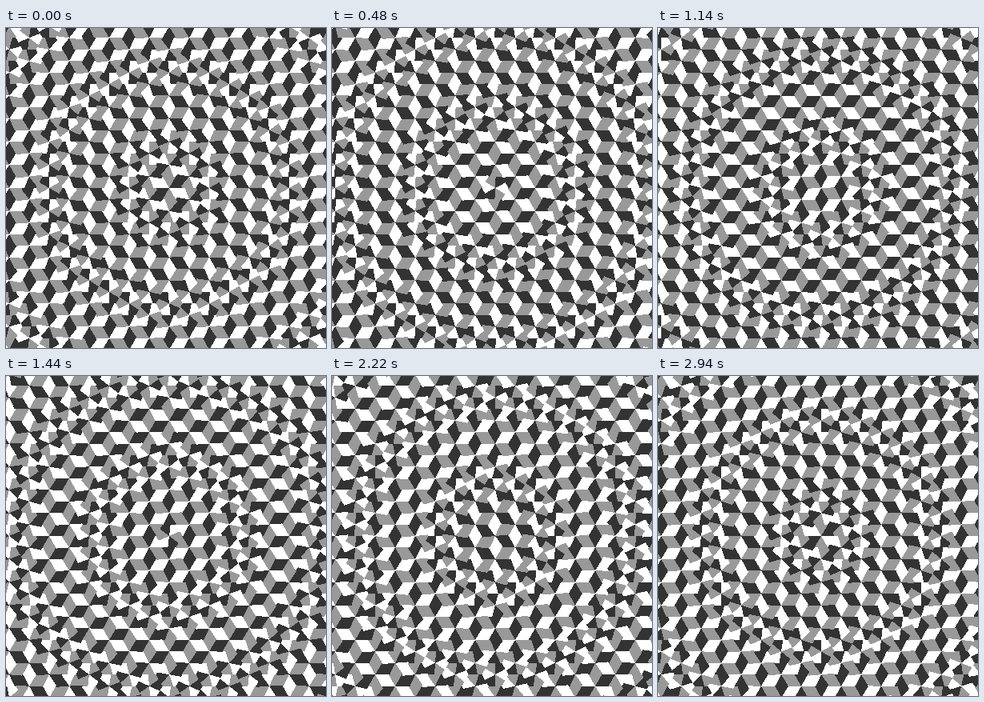
An HTML page with a canvas that plays this animation: 400x400 px, repeating every 3 s.

```html
<!DOCTYPE html>
<html>
<head>
<meta charset="utf-8">
<title>Turning hexagons</title>
<style>
html, body { margin: 0; width: 100%; height: 100%; overflow: hidden; background: #fff; }
canvas { display: block; width: 400px; height: 400px; }
</style>
</head>
<body>
<canvas id="stage" width="400" height="400"></canvas>
<script>
const SIZE = 400, CX = 204, CY = 200;
const COL = 25, ROW = 50 / Math.sqrt(3);   // spacing of flat-topped hexagons
const LOOP = 3000, STEP = 60, TURN = 1000, WAVE = 100;
const SHADES = [0xffffffff, 0xff999999, 0xff333333];

const ctx = document.getElementById('stage').getContext('2d');
const image = ctx.createImageData(SIZE, SIZE);
const pixels = new Uint32Array(image.data.buffer);
const lag = new Float64Array(SIZE * SIZE);
const sector = new Float64Array(SIZE * SIZE);

// Centre of the hexagon that holds the point
function hexCentre(x, y) {
  const near = Math.round(x / COL);
  let best = null, least = Infinity;
  for (let c = near - 1; c <= near + 1; c++) {
    const shift = c % 2 ? ROW / 2 : 0;
    const hx = c * COL;
    const hy = Math.round((y - shift) / ROW) * ROW + shift;
    const d = Math.hypot(x - hx, y - hy);
    if (d < least) { least = d; best = [hx, hy]; }
  }
  return best;
}

// Each hexagon has six wedges; opposite wedges share a shade
for (let i = 0; i < lag.length; i++) {
  const x = i % SIZE + 0.5 - CX;
  const y = Math.floor(i / SIZE) + 0.5 - CY;
  const [hx, hy] = hexCentre(x, y);
  lag[i] = Math.hypot(hx, hy) / WAVE;
  sector[i] = Math.atan2(y - hy, x - hx) * 3 / Math.PI;
}

const ease = p => p < 0.5 ? 2 * p * p : 1 - 2 * (1 - p) ** 2;
const mod3 = n => (n % 3 + 3) % 3;

// Every turn moves a hexagon on by one wedge, later the farther out it lies
function draw(time) {
  for (let i = 0; i < pixels.length; i++) {
    const p = time / TURN - lag[i];
    const whole = Math.floor(p);
    pixels[i] = SHADES[mod3(Math.floor(sector[i] + whole + ease(p - whole)))];
  }
  ctx.putImageData(image, 0, 0);
}

let shown = -1;
function tick() {
  const time = Math.floor(performance.now() % LOOP / STEP) * STEP;
  if (time !== shown) draw(shown = time);
  requestAnimationFrame(tick);
}
tick();
</script>
</body>
</html>
```
